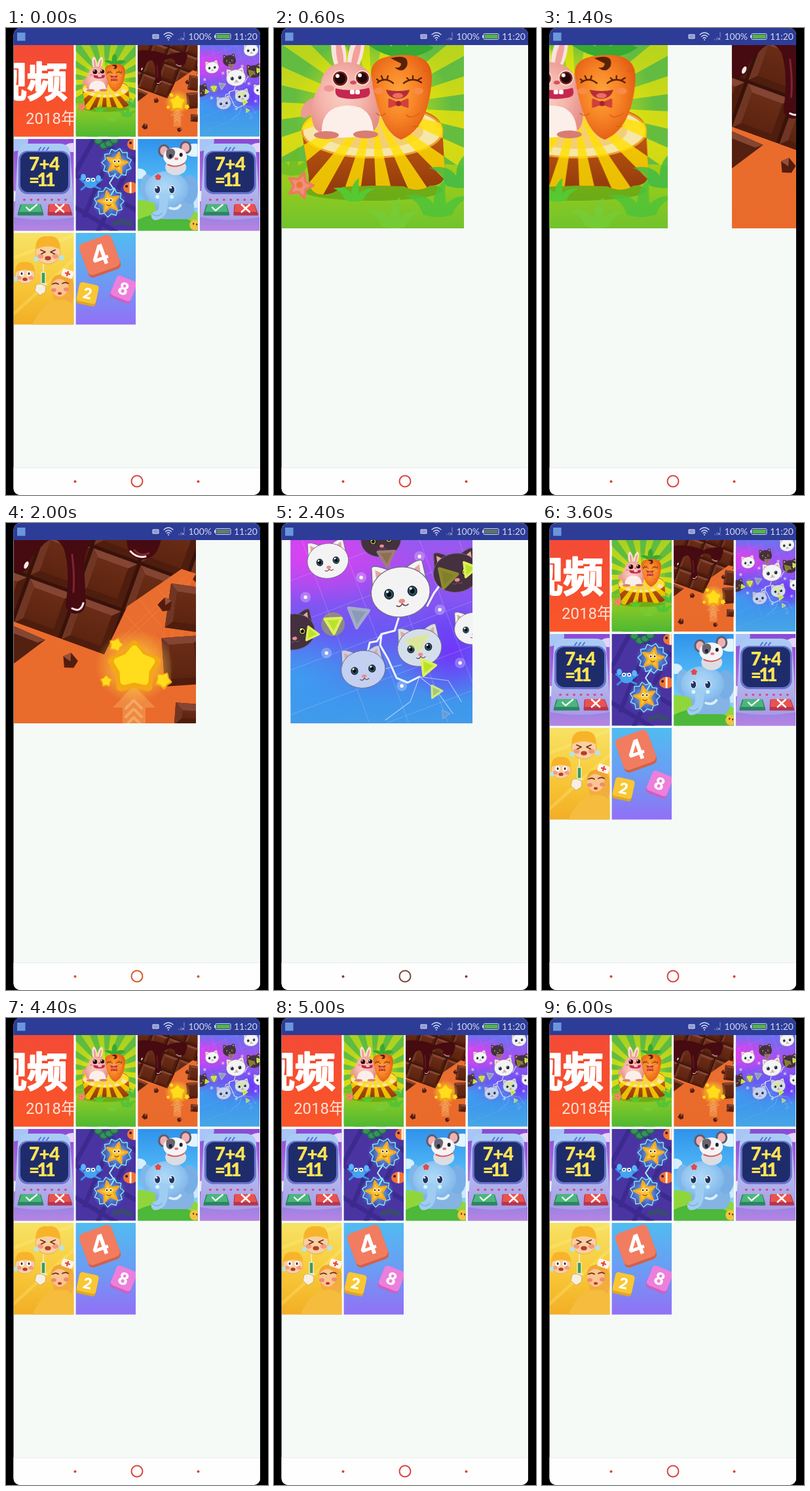
Write an HTML page that moves like this. It is 400x711 px and loops after 6.2 s.

```html
<!DOCTYPE html>
<html lang="zh">
<head>
<meta charset="utf-8">
<title>Picture grid</title>
<style>
  html, body { margin: 0; width: 100%; height: 100%; overflow: hidden; background: #000; }
  body > svg { display: block; width: 100vw; height: 100vh; }
  text { font-family: Lato, "Noto Sans CJK SC", "Noto Sans CJK", sans-serif; }
  .status { font-family: Roboto, sans-serif; font-size: 14px; }
</style>
</head>
<body>
<script>
// Shape helpers: each returns SVG markup
const oval = (x, y, rx, ry, fill, more = '') => `<ellipse cx="${x}" cy="${y}" rx="${rx}" ry="${ry}" fill="${fill}" ${more}/>`;
const box = (x, y, w, h, fill, r = 0, more = '') => `<rect x="${x}" y="${y}" width="${w}" height="${h}" rx="${r}" fill="${fill}" ${more}/>`;
const shape = (d, fill, more = '') => `<path d="${d}" fill="${fill}" ${more}/>`;
const line = (d, color, width, more = '') => shape(d, 'none', `stroke="${color}" stroke-width="${width}" stroke-linecap="round" stroke-linejoin="round" ${more}`);
const at = (x, y, scale, angle, body) => `<g transform="translate(${x} ${y}) rotate(${angle}) scale(${scale})">${body}</g>`;
const label = (x, y, size, fill, str, more = '') => `<text x="${x}" y="${y}" font-size="${size}" fill="${fill}" ${more}>${str}</text>`;
const edge = (color, width) => `stroke="${color}" stroke-width="${width}" stroke-linejoin="round"`;
const range = (n, f) => Array.from({ length: n }, (_, i) => f(i)).join('');
const stops = colors => colors.map((c, i) => `<stop offset="${i / (colors.length - 1)}" stop-color="${c}"/>`).join('');
const gradient = (id, ...colors) => `<linearGradient id="${id}" x2="0" y2="1">${stops(colors)}</linearGradient>`;
const ball = (id, ...colors) => `<radialGradient id="${id}" cx=".45" cy=".45" r=".6">${stops(colors)}</radialGradient>`;
const glow = (id, color) => `<radialGradient id="${id}"><stop stop-color="${color}"/><stop offset="1" stop-color="${color}" stop-opacity="0"/></radialGradient>`;
const scene = (id, x, y, w, h, body) =>
  `<symbol id="${id}" viewBox="${x} ${y} ${w} ${h}" preserveAspectRatio="xMidYMid slice">${body}</symbol>`;

const star = (x, y, r, fill, more = '', angle = 0, ratio = .6, tips = 5) => {
  const points = Array.from({ length: tips * 2 }, (_, i) => {
    const a = i * Math.PI / tips - Math.PI / 2 + angle, d = i % 2 ? r * ratio : r;
    return [x + d * Math.cos(a), y + d * Math.sin(a)].map(v => v.toFixed(1));
  });
  return shape('M' + points.join('L') + 'Z', fill, more);
};
const rays = (x, y, n, start) => range(n, i => {
  const tip = a => `${(x + 400 * Math.cos(a)).toFixed(1)} ${(y + 400 * Math.sin(a)).toFixed(1)}`;
  const a = start + i * 2 * Math.PI / n;
  return `M${x} ${y}L${tip(a)}L${tip(a + Math.PI / n)}Z`;
});
const tuft = (x, y, s, fill, opacity = 1) => at(x, y, s, 0,
  shape('M-14 0Q-18 -14 -32 -18Q-12 -22 -4 -10Q-4 -25 8 -34Q6 -20 8 -10Q18 -20 32 -17Q18 -12 14 0Q0 5 -14 0Z', fill, `opacity="${opacity}"`));

// Rabbit and carrot on a stump
const stump = 'M42 155Q48 118 150 116Q252 118 257 152L261 222Q260 240 238 240Q220 252 198 241L150 240L104 242Q88 256 68 253Q52 249 53 225Z';
const burst = rays(150, 120, 17, 3.19);
const rabbit = scene('rabbit', 12, -47, 278, 425,
  box(12, -47, 278, 425, 'url(#lawn)') +
  shape(burst, '#52b848', 'opacity=".85"') +
  oval(150, 120, 120, 110, 'url(#sun)') +
  shape('M12 205Q60 195 150 230Q240 200 290 210V378H12Z', 'url(#grass)') +
  tuft(28, 222, 1.2, '#69bd27', .8) +
  oval(150, 247, 108, 16, '#5a9a12', 'opacity=".6"') +
  shape(stump, 'url(#bark)') +
  oval(150, 157, 107, 40, '#f6e6a8', edge('#f0a02a', 3)) +
  oval(150, 157, 78, 27, '#f4cf72') +
  shape(burst, '#ffe000', 'opacity=".8" clip-path="url(#stump)"') +
  // rabbit
  [[-8, 99], [14, 125]].map(([a, x]) => at(x, 38, 1, a, oval(0, 0, 11, 31, '#fae3dd') + oval(1, 3, 5, 23, '#f2a09c'))).join('') +
  oval(53, 122, 9, 17, '#ec9c94', 'transform="rotate(35 53 122)"') +
  shape('M113 52Q76 52 71 86Q48 120 62 152Q74 167 112 166Q160 168 161 135Q163 106 151 83Q145 55 113 52Z', 'url(#fur)') +
  shape('M73 164Q70 119 113 118Q151 118 152 161Q110 171 73 164Z', '#fcefea') +
  oval(80, 163, 19, 6, '#d97c74') + oval(140, 162, 19, 6, '#d97c74') +
  [[101, 77, 12.5], [135, 76, 11.5]].map(([x, y, r]) => oval(x, y, r, r, '#fbe5df') +
    oval(x, y, r - 1.5, r - 1.5, '#742018') + oval(x, y, r - 4, r - 4, '#24070a') + oval(x - 4, y - 4, 3, 3, '#fff')).join('') +
  oval(121, 83, 5, 3, '#d64f62') +
  shape('M94 92Q120 98 145 91Q150 104 138 106Q118 110 102 106Q92 104 94 92Z', '#c5274f') +
  box(116, 94, 7, 7, '#fff', 2) + box(124, 94, 7, 7, '#fff', 2) +
  oval(84, 92, 8, 5, '#f29494') + oval(153, 90, 5, 5, '#f29494') +
  // carrot
  shape('M192 45Q166 42 144 26Q168 20 180 28Q176 2 194 -8Q207 6 202 28Q220 16 244 30Q222 46 192 45Z', '#38a932') +
  shape('M148 70Q147 42 196 41Q243 39 241 78Q236 153 194 170Q160 158 148 70Z', 'url(#carrot)') +
  line('M156 130Q165 136 170 130M222 130Q208 140 202 132M228 65H238M212 150H220', '#d9600f', 1.5) +
  shape('M178 46Q208 38 203 58Q196 70 184 60Q194 62 194 54Q186 50 178 46Z', '#582207') +
  line('M158 83Q170 74 182 84M157 78L161 81M164 73L166 78M174 73L173 77M198 84Q211 74 225 83M203 76L206 79M212 73V77M225 76L220 79', '#592106', 2.3) +
  shape('M171 94Q189 98 207 94Q204 107 189 108Q174 107 171 94Z', '#b52d36') + oval(189, 103, 8, 4, '#f06b67') +
  oval(160, 96, 7, 5, '#f98a4a') + oval(220, 96, 8, 5, '#f98a4a') +
  shape('M190 115L176 109V120ZM190 115L204 109V120Z', '#d2403a', edge('#d2403a', 3)) + oval(190, 115, 4, 4, '#a92230') +
  // plants
  star(40, 240, 20, '#f09078', edge('#ea7c60', 4), .3, .5) + oval(39, 239, 5, 5, '#ef7338') +
  tuft(122, 262, 1, '#55c832') + tuft(182, 302, 1.3, '#76cd38', .8) +
  tuft(250, 284, 1.6, '#4cc33a', .8) + tuft(284, 240, 1.5, '#33b94c', .75));

// Chocolate bar with stars
const tile = (x, y, w, h, angle) => at(x, y, 1, angle,
  box(-w / 2, -h / 2, w, h, '#4f1d0d') +
  shape(`M${-w / 2} ${-h / 2}H${w / 2}L${w / 2 - 11} ${11 - h / 2}H${11 - w / 2}Z`, '#844532') +
  shape(`M${-w / 2} ${-h / 2}V${h / 2}L${11 - w / 2} ${h / 2 - 11}V${11 - h / 2}Z`, '#703623') +
  box(11 - w / 2, 11 - h / 2, w - 22, h - 22, 'url(#cocoa)'));
const chip = (x, y, s, a) => at(x, y, s, a, shape('M-10 6L-6 -9L6 -10L11 4L2 11Z', '#551c0e') + shape('M-6 -9L6 -10L1 1Z', '#93503a'));
const gold = (x, y, r, a = 0) => star(x, y, r * .88, '#ffd315', edge('#f3a814', r * .34), a, .66) + star(x, y - r * .05, r * .68, '#ffdd1c', edge('#ffdd1c', r * .28), a, .66);
const chocolate = scene('chocolate', 12, -47, 278, 425,
  box(12, -47, 278, 425, 'url(#orange)') +
  line(range(14, i => `M${150 + i * 14} 240l90 -190M${110 + i * 14} 60l130 190`), '#f58c43', 1, 'opacity=".3"') +
  `<g clip-path="url(#bar)">` + box(12, -47, 278, 260, '#38120a') +
  range(30, i => {
    const a = i % 6 - 2, b = Math.floor(i / 6);
    return tile(130 + 72 * a + 25 * b, 156 + 26 * a - 72 * b, 71, 71, 20);
  }) + '</g>' +
  shape('M150 200L185 127L268 70L290 77L245 160L200 182Z', '#e96d2e') +
  line('M165 187L273 83M187 175L280 90M180 137L214 174M205 118L237 157M230 98L258 130', '#f49854', 1, 'opacity=".45"') +
  tile(278, 130, 62, 68, 8) + tile(270, 210, 60, 74, -4) + tile(284, 292, 52, 34, 4) +
  shape('M12 157L60 178L12 214Z', '#54200f') + shape('M12 157L60 178L48 182L12 168Z', '#844532') +
  chip(97, 210, 1.1, -20) + chip(243, 124, 1, 30) + chip(45, 330, 1.3, 20) + chip(205, 345, 1, 60) +
  // sauce
  shape('M12 -20Q80 -30 150 0Q200 -20 240 -10Q245 5 236 28Q230 55 207 56Q186 53 184 25Q166 8 145 20Q122 28 119 62L122 122Q120 139 104 138Q88 135 92 118Q98 68 88 38Q74 13 54 36Q40 45 34 68Q24 80 12 72Z', '#460a11') +
  line('M101 48Q105 80 103 105M196 41Q204 52 218 46', '#7c2530', 3) + line('M101 130Q114 137 118 122M190 43Q200 54 213 51', '#f7e9e5', 3) +
  oval(31, 64, 3, 6, '#f7e9e5', 'transform="rotate(25 31 64)"') +
  // arrow and stars
  shape('M195 247L228 281H213V330H178V281H163Z', '#f2934a', 'opacity=".75"') +
  line('M183 282L195 270L207 282M183 295L195 283L207 295M183 308L195 296L207 308', '#f6b574', 4, 'opacity=".7"') +
  oval(196, 218, 60, 56, 'url(#glow)') +
  gold(168, 186, 11, .3) + gold(153, 241, 9) + gold(240, 240, 13, .5) + gold(196, 221, 40));

// Cats joined by lightning
const cat = (x, y, s, color = '#f4f3f4', eye = '#2a5a68', a = -8) => at(x, y, s, a,
  [1, -1].map(m => `<g transform="scale(${m} 1)">` + shape('M42 -6L39 -41Q36 -48 9 -32Z', color, edge('#6d6a80', 1.2)) +
    shape('M34 -18L34 -37L19 -28Z', '#e9a59f') + '</g>').join('') +
  oval(0, 1, 45, 38, color, edge('#6d6a80', 1.2)) + shape('M-31 -23Q0 -43 31 -23L20 10H-20Z', color) +
  [-18, 18].map(e => oval(e, 2, 7.5, 8, '#141a24') + oval(e, 2, 6, 6.5, eye) + oval(e, 2, 3.5, 4, '#080b12') + oval(e - 2, -2, 2, 2, '#fff')).join('') +
  oval(0, 15, 5, 3.5, '#ea8f8a') + line('M-9 21Q-4 25 0 19Q4 25 9 21', '#6b4d55', 1.7));
const darkCat = (x, y, s) => cat(x, y, s, '#45303f', '#b3b62c');
const tri = (x, y, r, a = 0, fill = '#b8e32b', rim = '#e0ee5c') => at(x, y, r / 10, a, shape('M-9 -7L9 -8L1 9Z', fill, edge(rim, 3)));
const cats = scene('cats', 25, -47, 278, 425,
  box(25, -47, 278, 425, 'url(#night)') +
  oval(60, 40, 150, 85, 'url(#pink)') + oval(270, 195, 80, 75, 'url(#violet)') + oval(35, 240, 110, 80, 'url(#azure)') +
  line(range(6, i => `M25 ${20 + i * 68}l278 -105M${15 + i * 60} -47l130 350`), '#e9d5ff', 1, 'opacity=".25"') +
  [[48, 113], [133, 83], [222, 51], [253, 132], [284, 213], [80, 198], [195, 248]].map(([x, y]) =>
    oval(x, y, 8, 8, '#fff', 'opacity=".25"') + oval(x, y, 2.7, 2.7, '#fff')).join('') +
  line('M190 145L184 164L164 169L157 180L146 182L142 200M164 169L162 186L174 207L187 236L204 243L222 234M234 126L244 107L258 88', '#f0f5ff', 3) +
  line('M170 222L194 216M222 234L247 254L273 290M222 234L208 272L170 300M222 234L266 240L286 272', '#c9d7ff', 1.2, 'opacity=".8"') +
  darkCat(163, 25, .68) + darkCat(278, 75, .78) + darkCat(30, 165, .72) +
  cat(263, -24, .75) + cat(82, 57, .7) + cat(304, 160, .64) +
  cat(136, 222, .75, '#c3d0f2') + cat(222, 189, .75, '#d5dfeb') +
  shape('M198 178L237 168L222 198Z', '#e4ed51', 'opacity=".5"') + cat(193, 104, 1) +
  tri(171, 54, 14, 0, '#8d704e', '#9c7f78') + tri(262, 85, 16, 20, '#817f29', '#8c8a2e') +
  tri(296, 72, 12, 25) + tri(55, 170, 11, 40) + oval(90, 154, 18, 18, '#aab925', 'opacity=".5"') + tri(90, 156, 14) +
  tri(127, 144, 17, 10, '#899bb6', '#a2abc8') + tri(232, 221, 13, 25) + tri(245, 258, 10, 30, '#a4ca74', '#d5e685') +
  tri(260, 292, 7, 30, '#6599d9', '#74a5dc'));

// Arithmetic machine
const sums = scene('sums', 12, 169, 91.4, 139.5,
  box(12, 169, 92, 140, 'url(#machine)') + oval(8, 172, 26, 16, '#a9c4f6') +
  oval(102, 182, 13, 7, '#e4d4fa') + oval(12, 256, 12, 8, '#e5eafc') +
  shape('M14 263L18 190Q20 176 34 176H82Q96 176 98 190L103 263L104 292H12Z', 'url(#case)') +
  line('M50 186l3 -4M56 186l3 -4M62 186l3 -4', '#4b70d1', 2) +
  box(19, 187, 79, 66, '#6a72cc', 14) + box(22, 189, 73, 61, '#1e2c6c', 12) +
  label(35, 217, 28, '#ffe453', '7+4', 'font-weight="900" letter-spacing="-.8"') +
  label(35, 241, 28, '#ffe453', '=11', 'font-weight="900" letter-spacing="-4"') +
  range(7, i => oval(28 + i * 10.5, 261.5, 2, 1.8, '#c85088')) +
  shape('M23 270H52L56 284H19Z', '#2c8563', edge('#2c8563', 3)) + shape('M24 268H52L55 280H20Z', '#4cb57e') + line('M31 273L36 278L47 269', '#eef8f0', 2.3) +
  shape('M66 270H95L100 284H65Z', '#b53650', edge('#b53650', 3)) + shape('M66 268H95L99 280H65Z', '#e8534f') + line('M76 269L88 280M88 269L76 280', '#fff', 2.6) +
  shape('M12 288Q58 296 104 288V309H12Z', 'url(#base)'));

// Sea creatures
const starfish = (x, y, a) => oval(x, y, 26, 25, 'url(#spark)') +
  star(x, y, 23, 'none', edge('#7ce3fb', 1.5), a, .8, 11) +
  star(x, y, 17, '#fbc632', edge('#f0a92a', 3), a, .45) + oval(x - 3, y - 3, 2.4, 3, '#fff6d8') + oval(x + 3, y - 3, 2.4, 3, '#fff6d8') +
  oval(x - 3, y - 3, 1.2, 1.6, '#402010') + oval(x + 3, y - 3, 1.2, 1.6, '#402010') + line(`M${x - 3} ${y + 4}q3 3 6 0`, '#a64c12', 1.5);
const fish = (x, y) => oval(x, y, 11, 9, '#f27332') + line(`M${x} ${y - 7}v14`, '#fff1e1', 3) + oval(x - 6, y - 2, 2, 2, '#25183d');
const sea = scene('sea', 106.5, 169, 91.4, 139.5,
  box(106, 169, 93, 140, '#4a34a2') +
  line('M100 221L205 281M100 270L170 312M116 160L205 205M134 169L106 220M183 220L140 310M160 190L120 285', '#3c2a8f', 7) +
  [[141, 172], [149, 179], [157, 176], [165, 171]].map(([x, y]) => oval(x, y, 6, 5, '#36925a', edge('#24694d', 2))).join('') +
  fish(196, 177) + fish(190, 243) + [[168, 297], [178, 294], [187, 298]].map(([x, y]) => oval(x, y, 7, 4, '#3a4a70')).join('') +
  line('M167 222L158 236L165 246L157 260', '#a9f3ff', 2) + starfish(169, 206, .2) + starfish(157, 265, -.2) +
  line('M119 235L113 230M139 236L146 231M121 241L115 246M137 242L144 245', '#388ee5', 3) + oval(129, 236, 10, 8, '#47a2ef') +
  oval(118, 227, 4, 5, '#5bb4fa') + oval(141, 229, 4, 5, '#5bb4fa') + oval(125, 231, 3, 3, '#fff') + oval(133, 231, 3, 3, '#fff') +
  oval(125, 231, 1.3, 1.3, '#172149') + oval(133, 231, 1.3, 1.3, '#172149'));

// Elephant with a mouse on its head
const elephant = scene('elephant', 201, 169, 91.4, 139.5,
  box(201, 169, 92, 140, 'url(#sky)') + oval(288, 186, 17, 10, '#e2f4fe') + oval(203, 222, 11, 8, '#d5effe') + oval(287, 262, 14, 12, '#cdeafc') +
  shape('M201 262Q228 262 250 280Q276 270 293 282V309H201Z', '#8fd63a') + shape('M201 292Q246 270 293 300V309H201Z', '#4db83a') +
  shape('M228 258H284Q292 283 279 291H238Q225 284 228 258Z', '#83b4e4') +
  oval(215, 243, 10, 20, '#7fb6ea') + oval(280, 246, 13, 22, '#78aee6') + oval(245, 245, 33, 27, 'url(#hide)') +
  line('M240 258Q243 284 228 286', '#9fcdf2', 13) + line('M222 282Q230 290 238 282', '#7fb0e0', 1.5) +
  [231, 253].map(x => oval(x, 246, 5, 6.5, '#f2faff') + oval(x, 246, 4, 5.5, '#253461') + oval(x - 1.5, 243, 1.6, 1.6, '#fff') + oval(x, 257, 3, 3, '#d9f4ff')).join('') +
  star(232, 227, 4, '#e04a48', edge('#e04a48', 2), 0, .7) + line('M250 274Q260 278 266 270', '#d7edfc', 4) +
  oval(241, 187, 9, 10, '#5f5c68') + oval(274, 182, 9, 10, '#5f5c68') + oval(241, 187, 6, 7, '#eeb0b4') + oval(274, 182, 6, 7, '#eeb0b4') +
  oval(259, 212, 16, 12, '#dcdde3') + oval(258, 196, 18, 14, '#f4f4f5') + shape('M245 186Q254 180 258 188Q258 198 250 200Q242 198 245 186Z', '#68656f') +
  oval(251, 195, 2.5, 3, '#221d28') + oval(267, 193, 2.5, 3, '#221d28') + oval(260, 199, 3, 2, '#e97882') + line('M247 208Q260 214 272 206', '#d9595c', 2) +
  oval(288, 300, 8, 8, '#f5c341') + oval(286, 298, 1.2, 1.5, '#673316') + oval(291, 299, 1.2, 1.5, '#673316'));

// Patients and nurse
const face = (x, y, r) => oval(x, y, r, r * .96, '#fad0a0', edge('#eda95c', 1)) +
  shape(`M${x - r} ${y - r * .2}Q${x - r} ${y - r * 1.35} ${x} ${y - r * 1.25}Q${x + r} ${y - r * 1.35} ${x + r} ${y - r * .2}Q${x} ${y - r * .7} ${x - r} ${y - r * .2}Z`, '#f7b42a') +
  oval(x - r * .6, y + r * .35, r * .25, r * .2, '#f79a7c') + oval(x + r * .6, y + r * .35, r * .25, r * .2, '#f79a7c') +
  oval(x, y + r * .5, r * .25, r * .17, '#b0402f');
const nurse = scene('nurse', 12, 312, 91.4, 139.5,
  box(12, 312, 92, 140, 'url(#yellow)') + line('M12 350L104 315M12 435L104 352', '#fff18a', 5, 'opacity=".25"') +
  face(64, 341, 19) + line('M53 338L60 341L54 344M75 338L68 341L74 344', '#6b2d1d', 1.8) + oval(46, 352, 4, 4, '#b9e3dd') + oval(85, 350, 4, 4, '#b9e3dd') +
  face(29, 375, 15) + [24, 35].map(x => oval(x, 374, 3.5, 4, '#fff') + oval(x, 374, 1.5, 2, '#3d2730')).join('') + oval(15, 382, 3, 4, '#b9e3dd') +
  oval(88, 400, 17, 26, '#f2ad3c') + shape('M40 452Q58 414 79 414Q99 412 104 427V452Z', '#f6bc3e') +
  oval(82, 393, 13, 16, '#fac590') + shape('M68 394Q68 374 86 376Q102 380 98 396Q92 382 80 382Q72 384 68 394Z', '#f2a733') +
  line('M71 390Q76 387 80 390M86 389Q91 386 95 389', '#75301f', 1.8) +
  oval(73, 399, 4, 3, '#f08a70') + oval(92, 398, 4, 3, '#f08a70') + oval(82, 404, 3, 2, '#d12d31') +
  at(94, 374, 1, 18, box(-9, -6, 18, 12, '#fff5e8', 3) + line('M-3 0H3M0 -3V3', '#ea423c', 2.4)) +
  line('M57 373V360M57 391V398M52 390H62', '#eef4d5', 1.5) + box(54, 372, 6, 17, '#3f9a5a', 1, edge('#e6efd0', 1.5)) +
  shape('M46 391Q53 387 61 394L60 402L52 407L44 400Z', '#f6f0e2', edge('#dba85c', 1)));

// Number tiles
const block = (x, y, w, a, fill, dark, str, size) => at(x, y, 1, a, box(-w / 2, -w / 2 + 3, w, w, dark, w / 7) + box(-w / 2, -w / 2, w, w - 1, fill, w / 7) +
  label(0, size * .36, size, '#fff', str, 'font-weight="900" text-anchor="middle"'));
const numbers = scene('numbers', 106.5, 312, 91.4, 139.5,
  box(106, 312, 93, 140, 'url(#dusk)') + block(143, 346, 52, -20, '#f27c60', '#d2604a', 4, 43) +
  block(124.5, 404, 30, 12, '#f8c733', '#e0a426', 2, 23) + block(179.500, 397, 33, 22, '#ec7fdc', '#cb60c2', 8, 26));

const video = scene('video', 12, 26, 91.4, 139.5,
  box(12, 26, 92, 140, 'url(#red)') +
  label(-30, 105, 62, '#fff', '视频', `font-weight="900" ${edge('#fff', 2)}`) +
  label(30, 146, 24, '#ffe2d6', '2018年', 'style="font-family:Roboto,\'Noto Sans CJK SC\',sans-serif"'));

const defs = gradient('lawn', '#a6d022', '#d8dc14', '#a6cc1a') + gradient('grass', '#a8cf14', '#78c52a', '#4eb832') +
  gradient('bark', '#d5741a', '#b4500f', '#8f380b') + gradient('orange', '#d95220', '#ea6c2d', '#e96a2a') + gradient('cocoa', '#6a2c16', '#5c2410') +
  gradient('night', '#6a72f0', '#a650ef', '#6a58f3', '#3f96ec', '#46a6e6') + gradient('machine', '#8a4ad6', '#b070e2', '#8d7ae2') +
  gradient('case', '#a8cdf4', '#b3bdee', '#a99be6') + gradient('base', '#9b82e2', '#b884e2') + gradient('sky', '#2f92ec', '#55bdf6', '#a8dffa') +
  gradient('yellow', '#f7e266', '#f8cb3a', '#f2ae26') + gradient('dusk', '#50bcf0', '#6c9cf4', '#9270f6') + gradient('red', '#f44a36', '#fa5628') +
  ball('fur', '#fad0c4', '#f5b6ac', '#e58f88') + ball('carrot', '#fca63c', '#f78426', '#e25a12') + ball('hide', '#b0d8f6', '#9accf3', '#7fb4e8') +
  glow('glow', '#ffdf3c') + glow('sun', '#fff000') + glow('pink', '#e040f0') + glow('violet', '#7035f8') + glow('azure', '#3d9cf0') + glow('spark', '#5fd2ff') +
  `<clipPath id="stump">${shape(stump, '#000')}</clipPath>` +
  `<clipPath id="bar">${shape('M12 -47H290V90L268 70L185 127L188 140L150 200L12 150Z', '#000')}</clipPath>` +
  `<clipPath id="phone">${box(11.5, 0, 376.5, 711, '#000', 10)}</clipPath>` +
  rabbit + chocolate + cats + sums + sea + elephant + nurse + numbers + video;

const thumb = i => [12 + 94.6 * (i % 4), 26 + 143 * Math.floor(i / 4), 91.4, 139.5];
const thumbs = ['video', 'rabbit', 'chocolate', 'cats', 'sums', 'sea', 'elephant', 'sums', 'nurse', 'numbers'].map((id, i) => {
  const [x, y, w, h] = thumb(i);
  return `<use href="#${id}" x="${x}" y="${y}" width="${w}" height="${h}"/>`;
}).join('');
const pageMarkup = ['rabbit', 'chocolate', 'cats'].map(id =>
  `<svg class="page" viewBox="0 0 278 425" preserveAspectRatio="xMidYMid slice"><use href="#${id}" width="278" height="425"/></svg>`).join('');

const ink = '#d4daf3';
const statusBar = box(11, 0, 378, 26, '#2d3c96') + box(17, 7, 12.5, 12.5, '#6a97dc') +
  box(224, 10, 9, 6, '#8e9acd', 0, edge(ink, 1)) +
  line('M241 10Q248 4 255 10M243.5 13Q248 9 252.5 13M246 15.5Q248 13.5 250 15.5', ink, 1.3) + oval(248, 18, 1, 1, ink) +
  line('M264 18v-1M267 18v-3M272 13V7', '#8e9acd', 1) + line('M269 15l3 3M272 15l-3 3', ink, 1) +
  `<g class="status">${label(278.5, 18, 14, ink, '100%')}${label(348, 18, 14, ink, '11:20')}</g>` +
  box(320, 8.5, 23, 9, 'none', 1.5, edge(ink, 1)) + box(318, 11, 2, 4, ink) + box(321.5, 10, 20, 6, '#54b548', 0, 'id="charge"');
const navBar = box(11, 669, 378, 42, '#fdfefd') + box(11, 669, 378, 1, '#e9eeec') +
  `<g id="nav" color="#d9433f">${oval(200, 690, 8.5, 8.5, 'none', edge('currentColor', 2))}${oval(105.5, 690.5, 2, 2, 'currentColor')}${oval(293.5, 690.5, 2, 2, 'currentColor')}</g>`;

document.body.innerHTML = `<svg xmlns="http://www.w3.org/2000/svg" viewBox="0 0 400 711"><defs>${defs}</defs>
  <g clip-path="url(#phone)">${box(11, 0, 378, 711, '#f5faf7')}<g id="grid">${thumbs}</g>${pageMarkup}${statusBar}${navBar}</g></svg>`;

const LOOP = 6200, STEP = 200, PAGE_WIDTH = 376;
const grid = document.getElementById('grid'), nav = document.getElementById('nav'), charge = document.getElementById('charge');
const pages = [...document.querySelectorAll('.page')];
const easeOut = (t, from, to) => 1 - (1 - Math.min(1, Math.max(0, (t - from) / (to - from)))) ** 3;
const navColors = ['#d9433f', '#d4592b', '#7d4638'], chargeColors = ['#54b548', '#627d70', '#5e7567'];

function draw(t) {
  const open = easeOut(t, 100, 560) - easeOut(t, 3100, 3560);
  const scroll = easeOut(t, 1350, 1870) + easeOut(t, 2050, 2570);
  const current = Math.round(scroll);
  grid.setAttribute('opacity', 1 - open);
  pages.forEach((page, i) => {
    const shown = open === 1 ? Math.abs(i - scroll) < 1 : open > 0 && i === current;
    page.style.display = shown ? '' : 'none';
    const full = [12 + PAGE_WIDTH * (i - scroll), 26, 278, 279], small = thumb(i + 1);
    ['x', 'y', 'width', 'height'].forEach((name, k) => page.setAttribute(name, small[k] + (full[k] - small[k]) * open));
  });
  const tone = open > 0 ? current : 0;
  nav.setAttribute('color', navColors[tone]);
  charge.setAttribute('fill', chargeColors[tone]);
}

// The screen refreshes five times a second
const start = performance.now();
function tick() {
  const t = (performance.now() - start) % LOOP;
  draw(Math.floor(t / STEP) * STEP);
  requestAnimationFrame(tick);
}
tick();
</script>
</body>
</html>
```
